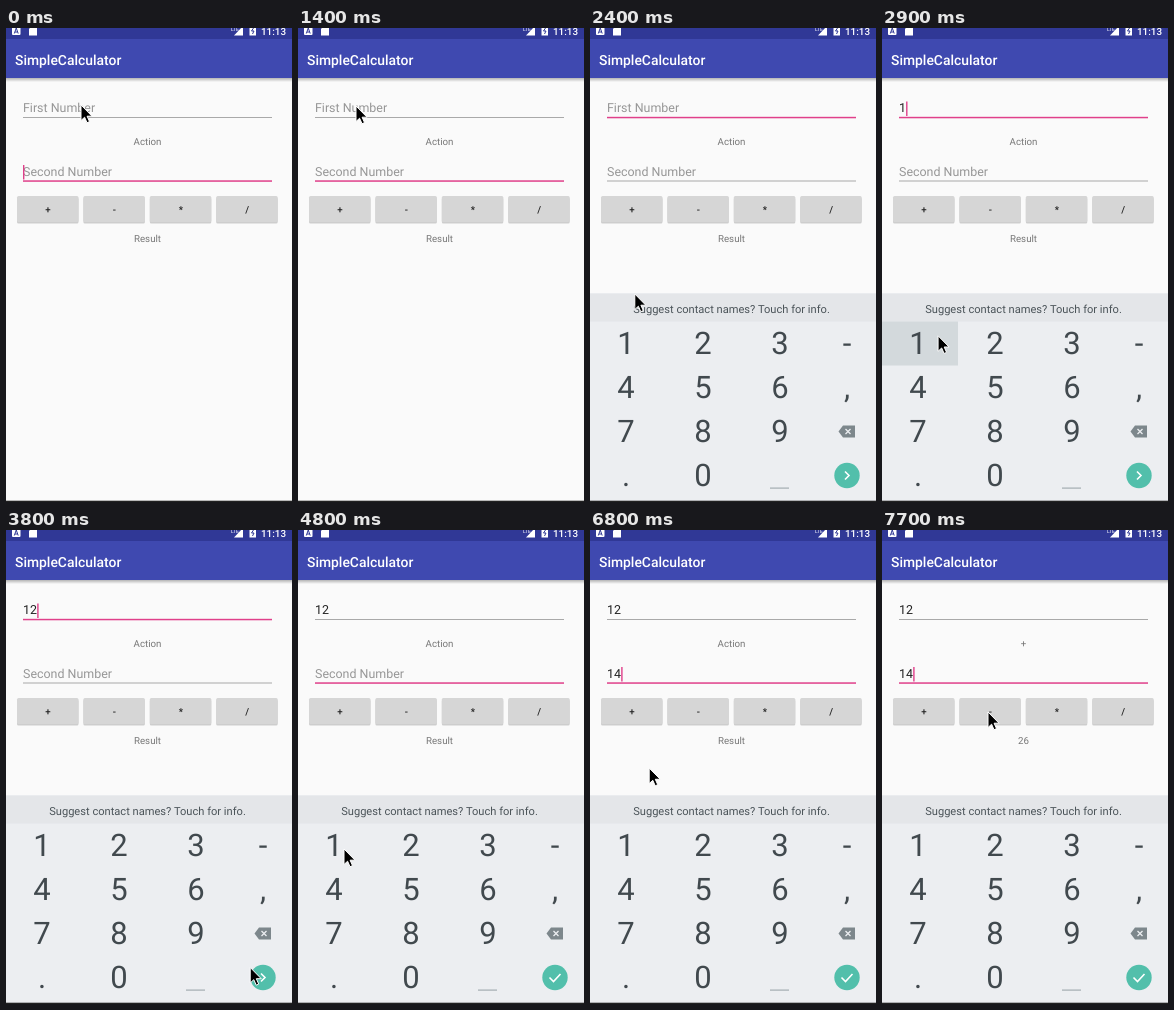
Animation, 286 px wide and 474 px high, one loop 8 s. Source, as an HTML page:

```html
<!DOCTYPE html>
<html lang="en">
<head>
<meta charset="utf-8">
<title>SimpleCalculator</title>
<style>
html, body { margin: 0; width: 100%; height: 100%; overflow: hidden; background: #fafafa; }
svg { display: block; width: 286px; height: 474px; font-family: Roboto, sans-serif; text-rendering: geometricPrecision; }
.mid { text-anchor: middle; }
.label { font-size: 9.73px; fill: #777; }
.field { font-size: 12.45px; }
.btn { font-size: 9.73px; font-weight: 500; fill: #222; }
.key { font-size: 31px; fill: #41494e; }
</style>
</head>
<body>
<svg viewBox="0 0 286 474">
  <defs>
    <linearGradient id="shade" x2="0" y2="1">
      <stop stop-opacity=".28"/><stop offset="1" stop-opacity="0"/>
    </linearGradient>
  </defs>
  <rect width="286" height="474" fill="#fafafa"/>
  <rect y="50" width="286" height="4" fill="url(#shade)"/>
  <rect width="286" height="50" fill="#3f49b0"/>
  <rect width="286" height="11" fill="#303896"/>
  <text x="9" y="36.5" font-size="13.9" font-weight="500" fill="#fff">SimpleCalculator</text>

  <!-- status bar -->
  <g fill="#fff">
    <rect x="6" y="-2" width="8.5" height="9" rx="1"/>
    <path d="M23 7.5V1L25.5-2H31V7.5Z"/>
    <path d="M228 7.5H237V-2Z"/>
    <path d="M243.5-2H250V7.5H243.5Z"/>
    <text x="255" y="7" font-size="9.9" font-weight="500">11:13</text>
    <text x="225" y="3" font-size="5">LTE</text>
  </g>
  <path d="M8.3 5.5L10.25 0 12.2 5.5M9 4H11.5M247.5 0L245.5 3H248L246.5 6" fill="none" stroke="#303896"/>

  <rect id="line0" x="17" width="249"/>
  <rect id="line1" x="17" width="249"/>
  <text id="field0" class="field" x="17" y="84"/>
  <text id="field1" class="field" x="17" y="147.7"/>
  <rect id="caret" width="1.4" height="14.5" fill="#e0408a"/>
  <text id="action" class="label mid" x="141.5" y="117"/>
  <text id="result" class="label mid" x="141.5" y="214"/>
  <g id="buttons"></g>
  <rect id="ripple" x="11" y="168" width="61.5" height="26" rx="1.5" fill-opacity=".14"/>

  <g id="keyboard">
    <rect y="265.5" width="286" height="209" fill="#eceef1"/>
    <rect y="265.5" width="286" height="28" fill="#e4e6e9"/>
    <text class="mid" x="141.5" y="285" font-size="11.12" fill="#4b5459">Suggest contact names? Touch for info.</text>
    <rect id="press" width="76" height="44" fill="#d3d9dc"/>
    <g id="keys"></g>
    <rect x="180" y="459.5" width="19" height="1.2" fill="#a4adb1"/>
    <path d="M248.5 403.5L253 397.5H265V409.5H253Z" fill="#7d878c"/>
    <path d="M255.5 401L260.5 406M260.5 401L255.5 406" stroke="#eceef1" stroke-width="1.3"/>
    <circle cx="257" cy="447.5" r="12.7" fill="#52bfab"/>
    <path id="enter" fill="none" stroke="#fff" stroke-width="1.6"/>
  </g>
  <rect y="472.7" width="286" height="1.3" fill="#222"/>
  <path id="mouse" d="M0 0V15.500L3.6 12.2 6 17.7 8.5 16.6 6.1 11.2H11Z" stroke="#fff"/>
</svg>
<script>
const $ = id => document.getElementById(id);
const set = (id, attrs) => {
  for (const name in attrs) $(id).setAttribute(name, attrs[name]);
};
const show = (id, on) => set(id, { visibility: on ? 'visible' : 'hidden' });
const clamp = v => Math.min(1, Math.max(0, v));

$('buttons').innerHTML = ['+', '-', '*', '/'].map((s, i) => {
  const x = 11 + i * 66.4;
  const box = (y, style) => `<rect x="${x}" y="${y}" width="61.5" height="26" rx="1.5" ${style}/>`;
  return box(169.4, 'fill-opacity=".18"') + box(168, 'fill="#d6d6d6"') +
    `<text class="btn mid" x="${x + 31}" y="185">${s}</text>`;
}).join('');

$('keys').innerHTML = ['123-', '456,', '789', '.0'].map((row, r) =>
  [...row].map((s, c) =>
    `<text class="key mid" x="${c < 3 ? 36 + c * 77 : 257}" y="${326.4 + r * 44}">${s}</text>`).join('')
).join('');

// The mouse pauses HOLD ms either side of each stop; a click takes effect as it leaves.
const HOLD = 100, BLINK = 500;
const stops = [
  { at: 1050, x: 75, y: 77 },
  { at: 1500, x: 58, y: 78, focus: 0 },
  { at: 1750, x: 58, y: 78 },
  { at: 2700, x: 42, y: 306, digit: 1 },
  { at: 3250, x: 113, y: 315, digit: 2 },
  { at: 3950, x: 248, y: 441, focus: 1 },
  { at: 4800, x: 46, y: 319, digit: 1 },
  { at: 5500, x: 46, y: 358, digit: 4 },
  { at: 5850, x: 68, y: 268 },
  { at: 6600, x: 68, y: 268 },
  { at: 7050, x: 43, y: 183, add: true },
  { at: 7700, x: 106, y: 182 }
];

function mouseAt(t) {
  const next = stops.findIndex(s => s.at + HOLD > t);
  if (next < 0) return stops.at(-1);
  const b = stops[next], a = stops[next - 1] || b;
  const leave = a.at + HOLD, arrive = b.at - HOLD;
  const k = a === b ? 0 : clamp((t - leave) / (arrive - leave));
  const e = k * k * (3 - 2 * k);
  return { x: a.x + (b.x - a.x) * e, y: a.y + (b.y - a.y) * e };
}

function stateAt(t) {
  const state = { focus: 1, values: ['', ''], edited: -100, sum: '' };
  for (const { at, focus, digit, add } of stops) {
    if (t < at + HOLD) break;
    if (focus !== undefined) state.focus = focus;
    if (digit) state.values[state.focus] += digit;
    if (focus !== undefined || digit) state.edited = at + HOLD;
    if (add) state.sum = +state.values[0] + +state.values[1];
  }
  return state;
}

function draw(t) {
  const { focus, values, edited, sum } = stateAt(t);
  ['First Number', 'Second Number'].forEach((hint, i) => {
    const active = i === focus;
    $('field' + i).textContent = values[i] || hint;
    set('field' + i, { fill: values[i] ? '#222' : '#979797' });
    set('line' + i, {
      y: 89 + i * 63.5 - (active ? .2 : 0),
      height: active ? 1.5 : 1,
      fill: active ? '#e0408a' : '#a9a9a9'
    });
  });
  set('caret', { x: 17 + values[focus].length * 7.1, y: 73.5 + focus * 63.5 });
  show('caret', (t - edited) % (2 * BLINK) < BLINK);
  $('action').textContent = sum ? '+' : 'Action';
  $('result').textContent = sum || 'Result';

  const rise = clamp((t - 1500) / 350);
  show('keyboard', rise > 0);
  set('keyboard', { transform: `translate(0 ${208 * (1 - rise) ** 3})` });
  set('enter', { d: focus ? 'M251.5 447.5L255.5 451.5 262.5 444' : 'M255 443.5L259 447.5 255 451.5' });

  const click = stops.find(s => t > s.at && t <= s.at + 2 * HOLD) || {};
  show('ripple', click.add);
  set('press', { opacity: click.digit ? 1 : 0 });
  if (click.digit) {
    const cell = click.digit - 1;
    set('press', { x: cell % 3 * 76, y: 293.5 + Math.floor(cell / 3) * 44 });
  }

  const { x, y } = mouseAt(t);
  set('mouse', { transform: `translate(${x} ${y})` });
}

const start = performance.now();
function tick() {
  const t = (performance.now() - start) % 8000;
  draw(Math.floor(t / 100) * 100);
  requestAnimationFrame(tick);
}
tick();
</script>
</body>
</html>
```
